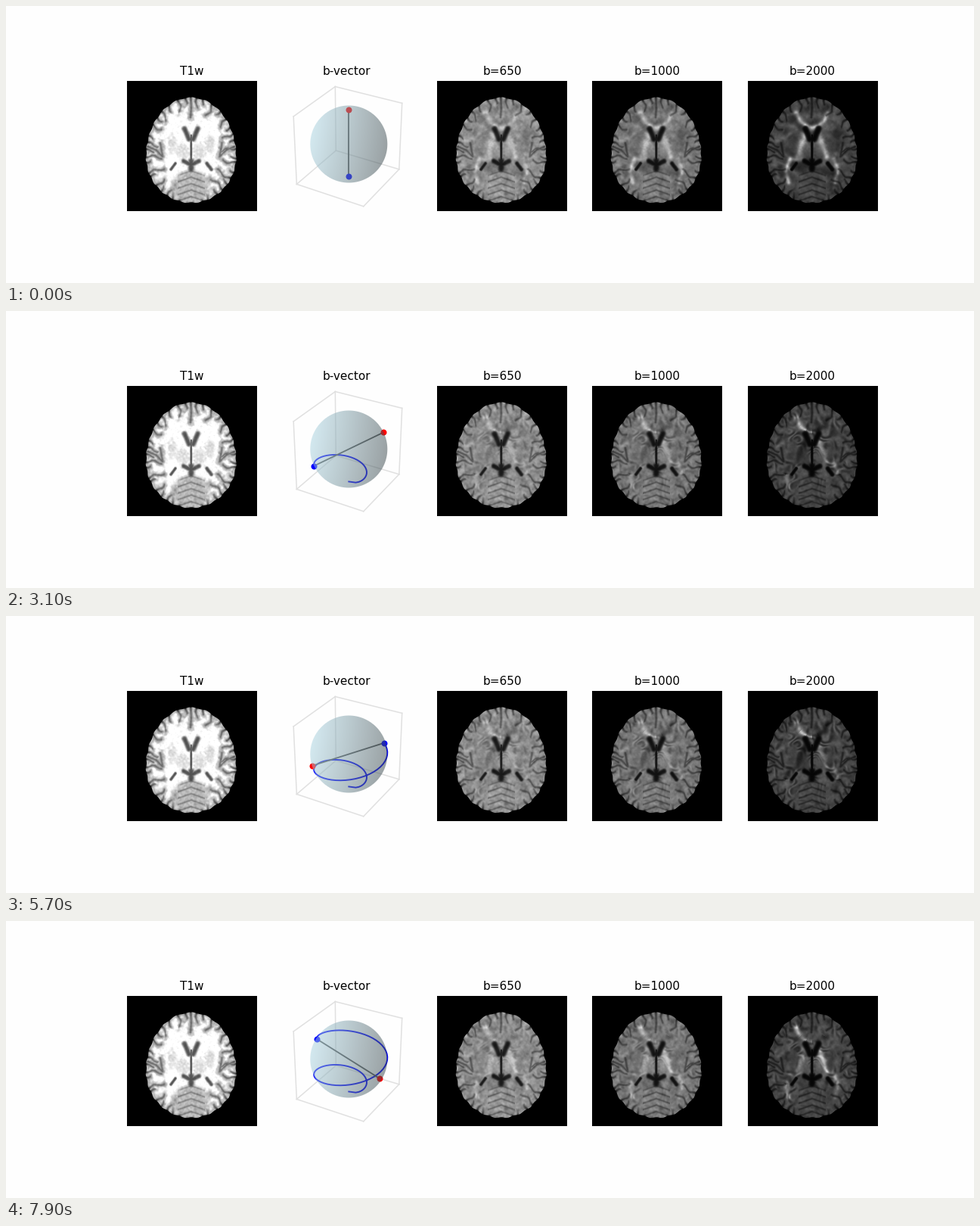
Animation of 1280 by 366 pixels, one loop 8 s. Source, as a matplotlib script:

```python
from itertools import combinations, product

import numpy as np
import matplotlib.pyplot as plt
from matplotlib.animation import FuncAnimation

W, H, DPI = 1280, 366, 128
PT = 72 / DPI                      # points per pixel
FRAMES, INTERVAL = 80, 100
SIZE, LEFT, TOP, STEP = 172, 160, 99, 205.15
TITLES = ["T1w", "b-vector", "b=650", "b=1000", "b=2000"]
B_VALUES = [0.65, 1.0, 2.0]

rng = np.random.default_rng(4)
Y, X = np.mgrid[0:SIZE, 0:SIZE] + 0.5
CX, CY = 84.8, 100                 # brain centre inside a panel


# ---------- helpers ----------
def noise(passes):
    """Smooth random field with unit spread."""
    n = rng.normal(size=(SIZE, SIZE))
    for _ in range(passes):
        for axis in (0, 1):
            n = (np.roll(n, 1, axis) + n + np.roll(n, -1, axis)) / 3
    return n / n.std()


def sigmoid(x):
    return 1 / (1 + np.exp(-np.clip(x, -40, 40)))


def segment_dist(p, q):
    dx, dy = q[0] - p[0], q[1] - p[1]
    t = ((X - p[0]) * dx + (Y - p[1]) * dy) / (dx * dx + dy * dy)
    t = np.clip(t, 0, 1)
    return np.hypot(X - p[0] - t * dx, Y - p[1] - t * dy)


def path_dist(points):
    """Distance to each segment of a polyline."""
    return np.array([segment_dist(p, q) for p, q in zip(points, points[1:])])


def mirror(points):
    return [(2 * CX - x, y) for x, y in points]


def oval(cx, cy, rx, ry, soft=0.15):
    return sigmoid((1 - np.hypot((X - cx) / rx, (Y - cy) / ry)) / soft)


# ---------- brain anatomy ----------
# outline: two half ellipses, longer towards the top
theta = np.arctan2(Y - CY, X - CX)
rad = np.hypot(X - CX, Y - CY)
reach = np.where(Y < CY, 78, 61)
edge = 1 / np.hypot(np.cos(theta) / 59.5, np.sin(theta) / reach)
depth = edge - rad + 0.6 * np.sin(23 * theta)

# radial folds, alternately deep and shallow
FOLDS = 38
fold = np.full((SIZE, SIZE), 99.0)
for k in range(FOLDS):
    a = 2 * np.pi * (k + rng.uniform(-0.3, 0.3)) / FOLDS
    length = rng.uniform(11, 21) if k % 2 else rng.uniform(4, 9)
    wave = 2.5 * np.sin(depth / 4 + rng.uniform(0, 6)) * np.clip(depth / 8, 0, 1)
    across = rad * ((theta - a + np.pi) % (2 * np.pi) - np.pi) + wave
    fold = np.minimum(fold, np.hypot(across, np.maximum(depth - length, 0)))
lateral = [(28, 87), (38, 91), (47, 100), (44, 82)]
for points in ([(84, 18), (85, 34), (84, 48)], lateral, mirror(lateral)):
    fold = np.minimum(fold, path_dist(points).min(0))

# cerebellum with stacked arches
cereb = oval(CX, 140, 25, 22, 0.08)
arch = (Y - 0.35 * np.abs(X - CX) - 123) % 8.5
stripes = np.exp(-((arch - 4.2) / 1.3) ** 2) * (np.abs(X - CX) < 18)

csf = np.exp(-(fold / 1.6) ** 2) * (1 - cereb) + 0.8 * stripes * cereb
near = np.minimum(depth, fold) + 0.9 * noise(3)
gray = sigmoid((4.2 - near) * 0.9) * (1 - cereb) + 0.9 * cereb

# fluid spaces: horns, midline slit, cistern, rear horns
horn, rear = [(76, 63), (82, 77)], [(58, 117), (64, 109)]
cavity = np.zeros((SIZE, SIZE))
for points, width in [(horn, 3.6), (mirror(horn), 3.6),
                      (rear, 2), (mirror(rear), 2.6),
                      ([(CX, 72), (CX, 104)], 1.5),
                      ([(CX, 106), (CX, 116)], 4.2),
                      ([(75, 106), (CX, 111), (95, 106)], 3.2)]:
    cavity = np.maximum(cavity, np.exp(-(path_dist(points).min(0) / width) ** 3))

nuclei = np.zeros((SIZE, SIZE))
for dx, cy, rx, ry in [(11, 93, 9, 11), (25, 83, 6, 13)]:
    for x in (CX - dx, CX + dx):
        nuclei = np.maximum(nuclei, oval(x, cy, rx, ry))

mask = np.clip(depth + 0.5, 0, 1) * (1 - 0.7 * csf * np.exp(-np.clip(depth, 0, 50) / 2))
white = (1 - gray) * (1 - nuclei) * (1 - cavity)
grain = noise(1)

t1 = 264 - 88 * gray - 42 * nuclei * (1 - gray) + 9 * grain
t1 = t1 * (1 - 0.36 * csf) * (1 - 0.68 * cavity)
t1 = np.clip(t1 * mask, 0, 255)

# ---------- diffusion model ----------
base = 215 * (1 - 0.13 * white - 0.06 * nuclei) * (1 + 0.035 * grain + 0.06 * noise(5))
base = base * (1 - 0.33 * csf) * (1 - 0.75 * cavity) * mask
decay = 0.58 + 0.15 * csf + 0.5 * cavity


def tensor(v, amount):
    """Diffusion along v: lower signal when the gradient is aligned."""
    outer = np.einsum("iyx,jyx->ijyx", v, v)
    return amount * (0.65 * outer - np.eye(3)[:, :, None, None] / 3)


def tract(points, width, z, amount):
    d = path_dist(points)
    dirs = np.array([(q[0] - p[0], p[1] - q[1], 0.0)
                     for p, q in zip(points, points[1:])])
    dirs /= np.linalg.norm(dirs, axis=1, keepdims=True)
    dirs[:, 2] = z
    dirs /= np.linalg.norm(dirs, axis=1, keepdims=True)
    v = np.moveaxis(dirs[d.argmin(0)], -1, 0)
    return tensor(v, amount * np.exp(-(d.min(0) / width) ** 2) * (1 - 0.6 * cavity))


angle, tilt = 2.2 * noise(40), 0.7 * noise(40)
field = np.array([np.cos(angle) * np.cos(tilt),
                  np.sin(angle) * np.cos(tilt), np.sin(tilt)])
diffusion = tensor(field, 0.45 * white + 0.1)
arm = [(64, 42), (69, 53), (77, 59)]
diffusion += tract(arm + [(CX, 61)] + mirror(arm)[::-1], 3.2, 0, 1.3)
capsule = [(65, 100), (70, 86), (76, 72)]
radiation = [(54, 134), (50, 117), (56, 103)]
thalamus = [(73, 100), (77, 84)]
for points, width, z, amount in [(capsule, 4, 0.3, 1.3),
                                 (radiation, 3.2, 0.1, 1.2),
                                 (thalamus, 7, 0.4, 0.45)]:
    diffusion += tract(points, width, z, amount)
    diffusion += tract(mirror(points), width, z, amount)


def scan(b, g):
    d = decay + np.einsum("i,j,ijyx->yx", g, g, diffusion)
    return np.clip(base * np.exp(-b * d), 0, 255)


# ---------- 3D view ----------
ORIGIN, SCALE, PERSP = (453.3, 182.5), 51, 0.058
az, el = np.radians(-60), np.radians(30)
RIGHT = np.array([-np.sin(az), np.cos(az), 0])
UP = np.array([-np.sin(el) * np.cos(az), -np.sin(el) * np.sin(az), np.cos(el)])
TOWARD = np.cross(RIGHT, UP)
LIGHT = np.array([-2, -2, 1]) / 3


def project(p):
    p = np.asarray(p, float)
    s = SCALE / (1 - PERSP * (p @ TOWARD))
    return ORIGIN[0] + s * (p @ RIGHT), ORIGIN[1] - s * (p @ UP)


def spiral(i):
    """Gradient direction: rises evenly from the south pole, two turns in 100 steps."""
    u = np.asarray(i) / 100
    z, phi = 2 * u - 1, 4 * np.pi * u
    r = np.sqrt(1 - z * z)
    return np.stack([r * np.cos(phi), r * np.sin(phi), z], axis=-1)


def glass_ball(x0, y0, size, layer=0.3):
    """Two translucent shaded layers, back and front."""
    py, px = np.mgrid[0:size, 0:size] + 0.5
    a = (px + x0 - ORIGIN[0]) / SCALE
    b = (ORIGIN[1] - py - y0) / SCALE
    r = np.hypot(a, b)
    c = np.sqrt(np.clip(1 - r * r, 0, 1))
    side = a * (LIGHT @ RIGHT) + b * (LIGHT @ UP)
    facing = c * (LIGHT @ TOWARD)
    back, front = 0.65 + 0.35 * (side - facing), 0.65 + 0.35 * (side + facing)
    total = 1 - (1 - layer) ** 2
    shade = (layer * (1 - layer) * back + layer * front) / total
    rgba = np.empty((size, size, 4))
    rgba[..., :3] = np.clip(shade[..., None] * np.array([173, 216, 230]) / 255, 0, 1)
    rgba[..., 3] = total * np.clip((1 - r) * SCALE + 0.5, 0, 1)
    return rgba


# ---------- stage ----------
fig = plt.figure(figsize=(W / DPI, H / DPI), dpi=DPI, facecolor="#fefefe")
ax = fig.add_axes([0, 0, 1, 1])
ax.axis("off")


def place(img, x, y, size, **style):
    return ax.imshow(img, extent=(x, x + size, y + size, y), aspect="auto",
                     interpolation="nearest", **style)


def panel(k, img):
    return place(img, round(LEFT + STEP * k), TOP, SIZE, cmap="gray", vmin=0, vmax=255)


for k, title in enumerate(TITLES):
    ax.text(LEFT + STEP * k + 85.6, 91.4, title, ha="center", va="baseline",
            family="DejaVu Sans", fontsize=15.24 * PT, color="black")

panel(0, t1)
scans = [panel(k + 2, scan(b, spiral(0))) for k, b in enumerate(B_VALUES)]

# cube edges that do not meet the nearest corner
for p, q in combinations(product((-1, 1), repeat=3), 2):
    one_step = sum(m != n for m, n in zip(p, q)) == 1
    if one_step and (1, -1, 1) not in (p, q):
        ax.plot(*project([p, q]), color="#e0e0e0", lw=1.5 * PT, zorder=2)

trail, = ax.plot([], [], color="blue", lw=1.9 * PT, zorder=3)
rod, = ax.plot([], [], color="#555555", lw=1.8 * PT, zorder=3)
dot = dict(marker="o", ms=8 * PT, mew=0, ls="", zorder=4)
head, = ax.plot([], [], color="blue", **dot)
tail, = ax.plot([], [], color="red", **dot)
place(glass_ball(400, 129, 108), 400, 129, 108, zorder=5)
ax.set_xlim(0, W)
ax.set_ylim(H, 0)


def update(i):
    g = spiral(i)
    xs, ys = project([g, -g])
    trail.set_data(*project(spiral(np.arange(i + 1))))
    rod.set_data(xs, ys)
    head.set_data(xs[:1], ys[:1])
    tail.set_data(xs[1:], ys[1:])
    for image, b in zip(scans, B_VALUES):
        image.set_data(scan(b, g))
    return [trail, rod, head, tail, *scans]


anim = FuncAnimation(fig, update, frames=FRAMES, interval=INTERVAL,
                     init_func=lambda: update(0), repeat=True)
plt.show()
```
